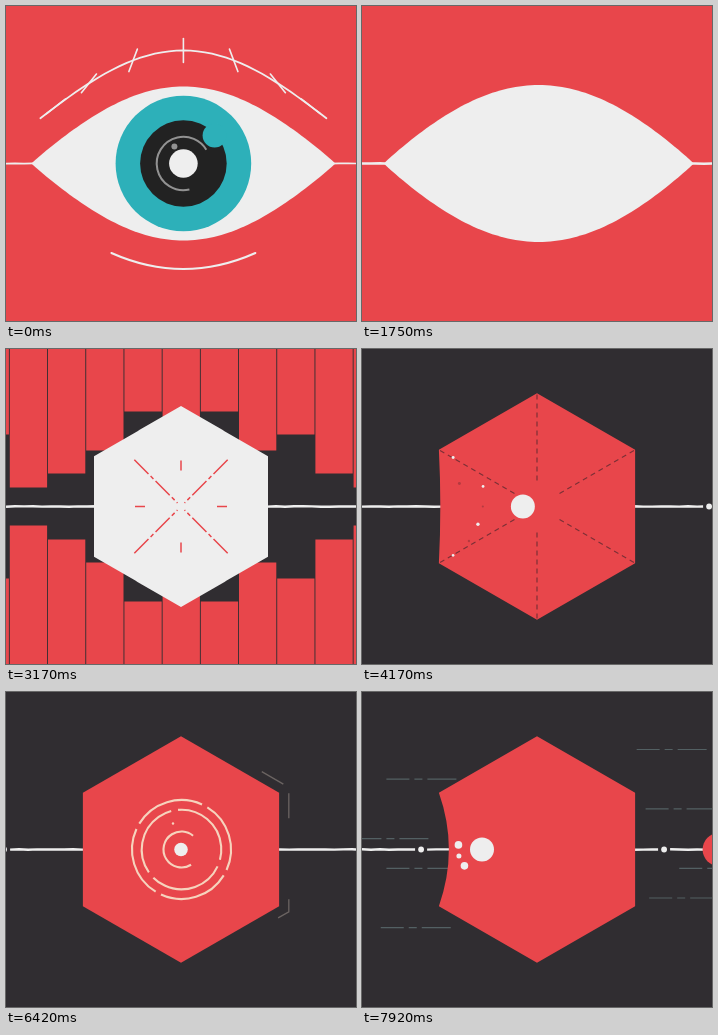
An HTML page with a canvas for the animation above (8 s loop, 350 by 315 pixels).

```html
<!DOCTYPE html>
<html lang="en">
<head>
<meta charset="utf-8">
<title>Eye to hexagon</title>
<style>
html, body { margin: 0; width: 100%; height: 100%; overflow: hidden; background: #e8464b; }
canvas { display: block; width: 100%; height: 100%; }
</style>
</head>
<body>
<canvas id="stage" width="350" height="315"></canvas>
<script>
const ctx = document.getElementById('stage').getContext('2d');
const W = 350, H = 315, MID = 157.5, CX = 175, EYE_X = 177.4;
const LOOP = 8000, STEP = 1000 / 12;
const RED = '#e8464b', WHITE = '#eeeeee', DARK = '#302d31', TEAL = '#2db0b9',
      INK = '#222222', GREY = '#929292', CREAM = '#f6d3bd', DUST = '#536063';
const RAD = Math.PI / 180;

const clamp = v => Math.max(0, Math.min(1, v));
const lerp = (a, b, k) => a + (b - a) * k;
const part = (t, a, b) => clamp((t - a) / (b - a));
const smooth = k => k * k * (3 - 2 * k);
const out = k => 1 - (1 - k) ** 3;
const ease = (t, a, b) => smooth(part(t, a, b));
const range = (n, fn) => Array.from({ length: n }, (_, i) => fn(i));
const rand = n => {
  const s = Math.sin(n * 127.1 + 11.7) * 43758.5453;
  return s - Math.floor(s);
};
const polar = (r, deg, cx = CX, cy = MID) =>
  [cx + r * Math.cos(deg * RAD), cy + r * Math.sin(deg * RAD)];
const hexagon = r => range(6, i => polar(r, i * 60 - 90));

function disc(x, y, r, color) {
  if (r <= 0) return;
  ctx.fillStyle = color;
  ctx.beginPath();
  ctx.arc(x, y, r, 0, 7);
  ctx.fill();
}

function arc(x, y, r, from, to, color, width) {
  ctx.strokeStyle = color;
  ctx.lineWidth = width;
  ctx.beginPath();
  ctx.arc(x, y, r, from * RAD, to * RAD);
  ctx.stroke();
}

function path(pts) {
  ctx.beginPath();
  pts.forEach(([x, y]) => ctx.lineTo(x, y));
}

function line(pts, color, width, dash = []) {
  ctx.strokeStyle = color;
  ctx.lineWidth = width;
  ctx.setLineDash(dash);
  path(pts);
  ctx.stroke();
  ctx.setLineDash([]);
}

// Draws the part of a polyline between two fractions of its length.
function trace(pts, from, to, color, width) {
  if (to <= from) return;
  let len = 0;
  for (let i = 1; i < pts.length; i++) {
    len += Math.hypot(pts[i][0] - pts[i - 1][0], pts[i][1] - pts[i - 1][1]);
  }
  line(pts, color, width, [0, len * from, len * (to - from), len * 2]);
}

function fillStage(color) {
  ctx.fillStyle = color;
  ctx.fillRect(0, 0, W, H);
}

// The horizontal line, with a slight wobble that changes every step.
function thread(x0, x1, n, width) {
  if (x1 <= x0) return;
  const pts = range(Math.ceil((x1 - x0) / 9), i =>
    [x0 + i * 9, MID + (rand(x0 + i * 9 + n * 3) - 0.5) * 0.6]);
  line([...pts, [x1, MID]], WHITE, width);
}

// Half heights across the shape, u from -1 to 1.
const eyeCurve = u => Math.max(0, Math.cos(u * Math.PI / 2)) ** 0.95;
const lensCurve = u => 1 - u * u;
const hexCurve = u => 1 - Math.abs(u) / 2;

// White shape that goes from eye to lens to hexagon.
function whitePath(t) {
  const a = ease(t, 1580, 2080), b = ease(t, 2520, 2950);
  const cx = lerp(EYE_X, CX, a);
  const half = lerp(lerp(152, 163, a), 87, b);
  const side = dir => range(81, i => {
    const u = (i / 40 - 1) * dir;
    const h = lerp(lerp(77 * eyeCurve(u), 82.5 * lensCurve(u), a), 100.5 * hexCurve(u), b);
    return [cx + u * half, MID - h * dir];
  });
  path([...side(1), ...side(-1)]);
  ctx.closePath();
}

const gaze = t => ease(t, 250, 750) * (1 - ease(t, 1200, 1450));

function brows(t) {
  const show = 1 - ease(t, 1420, 1750);
  if (show <= 0) return;
  const top = 44.5 - 20 * ease(t, 1300, 1600);
  const browY = x => top + 75 * (1 - Math.cos(x / 97));
  const half = (143 + 2 * gaze(t)) * show;
  ctx.lineCap = 'round';
  line(range(41, i => {
    const x = half * (i / 20 - 1);
    return [EYE_X + x, browY(x)];
  }), WHITE, 1.8);
  for (let i = -3; i <= 3; i++) {
    const x = 147 * Math.sin(i * 20 * RAD), tilt = x * 0.41 - 90;
    const end = r => polar(r * show, tilt * 1, EYE_X + x, browY(x));
    line([end(-12), end(12)].map(([px, py]) => [2 * (EYE_X + x) - px, py]), WHITE, 1.6);
  }
  const w = (72 + 2 * gaze(t)) * show;
  ctx.beginPath();
  ctx.lineWidth = 2;
  ctx.moveTo(EYE_X - w, 263 - 16 * show);
  ctx.quadraticCurveTo(EYE_X, 263 + 16 * show, EYE_X + w, 263 - 16 * show);
  ctx.stroke();
  ctx.lineCap = 'butt';
}

function iris(t) {
  const size = 1 - ease(t, 1450, 1750), look = gaze(t);
  if (size <= 0) return;
  ctx.save();
  ctx.translate(EYE_X - 23 * look, MID + 16 * look);
  ctx.scale(size, size);
  disc(0, 0, 67.8, TEAL);
  disc(0, 0, 43.3, INK);
  disc(...polar(42, lerp(-42, -70, look), 0, 0), 12, TEAL);
  arc(0, 0, 26.7, lerp(77, 85, look), lerp(329, 360, look), GREY, 2);
  disc(-9, -17, 3, GREY);
  disc(0, 0, 14.3, WHITE);
  ctx.restore();
}

// Isometric line drawing: nested chevrons, six spokes and two strays.
const chevron = w => [
  [CX + 0.32 * w, MID - 0.4 * w], [CX + w, MID],
  [CX, MID + 0.59 * w], [CX - 0.78 * w, MID + 0.12 * w]];
const FACETS = [
  ...[33, 56, 100].map(chevron),
  ...range(6, i => {
    const start = i % 3 === 1 ? 27 : 60;
    return [polar(start, 30 + i * 60), polar(start + 38, 30 + i * 60)];
  }),
  [[186, 94], [209, 81]],
  [[180, 195], [218, 217]]
];

function facets(t) {
  const from = ease(t, 2350, 2620), to = ease(t, 1850, 2220);
  FACETS.forEach(f => trace(f, from, to, RED, 1.4));
}

function sparks(t, color) {
  if (t <= 1760 || t > 2650) return;
  const fly = out(part(t, 1750, 2750)) / 0.875;
  const size = 1 - ease(t, 2330, 2650);
  for (let i = 0; i < 27; i++) {
    const far = i % 2, swing = rand(i + 40);
    const r = far ? 95 + 28 * swing : 45 + 85 * swing;
    const [x, y] = polar(r * fly, i * 137.5 + 20);
    disc(x, y, (far ? 2.5 + 2 * rand(i) : 1 + 1.2 * rand(i)) * size, color);
  }
}

// Half openings of the bars, left to right.
const GAPS = [72, 19, 33, 56, 95, 85, 95, 56, 72, 33, 19];

function bars(t) {
  fillStage(DARK);
  ctx.fillStyle = RED;
  const seam = part(t, 2500, 2800);
  GAPS.forEach((g, i) => {
    const gap = t < 3166 ? g * part(t, 2600, 3166) ** 2 : lerp(g, 162, ease(t, 3166, 3750));
    const x = 3.3 + (i - 1) * 38.2 + seam * 0.5, w = 38.3 - seam;
    ctx.fillRect(x, 0, w, Math.max(0, MID - gap));
    ctx.fillRect(x, MID + gap, w, H);
  });
}

function cross(t) {
  const k = ease(t, 2850, 3160) * (1 - ease(t, 3420, 3650));
  if (k <= 0) return;
  for (let a = 0; a < 360; a += 90) {
    trace([polar(46, a), polar(36, a)], 0, k, RED, 1.5);
    line([polar(66, a + 45), polar(66 - 61 * k, a + 45)], RED, 1.5, [20, 3, 4, 3]);
  }
}

function opening(t, n) {
  if (t < 2500) fillStage(RED);
  else bars(t);
  thread(0, W, n, t < 1600 ? 1.7 : 2.4);
  brows(t);
  sparks(t, WHITE);
  ctx.save();
  whitePath(t);
  ctx.fillStyle = WHITE;
  ctx.fill();
  ctx.clip();
  iris(t);
  facets(t);
  sparks(t, RED);
  ctx.restore();
  cross(t);
}

// Beads ride the line to the left, evenly spaced.
function beads(t, n) {
  if (t < 3900) return thread(0, W, n, 2.4);
  const gap = 243;
  const shift = t < 6417 ? lerp(347, -245, (t - 4167) / 2250)
                         : lerp(-2, -427, (t - 6417) / 1500);
  for (let x = (shift % gap + gap) % gap - gap; x < W + gap; x += gap) {
    thread(Math.max(0, x + 6), Math.min(W, x + gap - 6), n, 2.4);
    disc(x, MID, 2.9, WHITE);
  }
}

function streaks(t) {
  if (t < 7560) return;
  ctx.globalAlpha = part(t, 7500, 7750);
  for (let i = 0; i < 8; i++) {
    const y = 57.5 + 29.7 * (i > 4 ? i - 1 : i);
    const x = (i % 2 ? -30 : 270) + 55 * rand(i + 3) + (7917 - t) * 0.35;
    line([[x + 70, y], [x, y]], DUST, 1.2, [29, 5, 8, 5]);
  }
  ctx.globalAlpha = 1;
}

function redHex(r, bend) {
  const p = hexagon(r);
  path(p.slice(0, 5));
  ctx.quadraticCurveTo(p[4][0] + bend, MID, ...p[5]);
  ctx.closePath();
  ctx.fillStyle = RED;
  ctx.fill();
}

function creases(t) {
  const to = ease(t, 3800, 4080), from = ease(t, 4450, 4900);
  if (to <= from) return;
  for (let a = 30; a < 390; a += 60) {
    line([polar(lerp(112, 22, from), a), polar(lerp(112, 22, to), a)], '#7d3036', 1.2, [5, 4]);
  }
}

// A circle broken by evenly spaced gaps, angles in degrees.
function ring(r, count, gap, first, turn) {
  const span = 360 / count;
  for (let i = 0; i < count; i++) {
    const a = first + turn + i * span;
    arc(CX + 0.5, MID, r, a + gap / 2, a + span - gap / 2, CREAM, 2.1);
  }
}

function rings(t) {
  const grow = out(part(t, 5150, 5800)) * (1 - ease(t, 6750, 7200));
  if (grow <= 0.02) return;
  const turn = (t - 6417) * 0.06;
  ring(49.5 * grow, 4, 7, -62, turn);
  ring(39.8 * grow, 3, 10, -100, -turn);
  ring(18 * grow, 1, 108, 4, turn * 1.5);
  disc(CX - 8 * grow, MID - 26 * grow, 1.2, CREAM);
}

function outline(t) {
  if (t < 5950 || t > 7000) return;
  const p = hexagon(124.5), shift = (t - 6417) / 400;
  ctx.globalAlpha = ease(t, 5950, 6200) * (1 - ease(t, 6700, 7000));
  [0.75, 1.05, 1.9].forEach(side => {
    const a = side + shift;
    trace([...p, p[0]], clamp(a / 6), clamp((a + 0.2) / 6), '#6b6462', 1.3);
  });
  ctx.globalAlpha = 1;
}

function ball(t) {
  const enter = t < 4167 ? lerp(-20, 161, part(t, 3720, 4167))
                         : lerp(161, CX, out(part(t, 4167, 4420)));
  const x = enter - 55 * ease(t, 7350, 7917);
  const small = ease(t, 5000, 5500) * (1 - ease(t, 6850, 7250));
  disc(x, MID, lerp(12, 6.8, small), WHITE);
  const trail = ease(t, 7500, 7917);
  for (let i = 0; i < 3; i++) {
    disc(...polar(24 * trail, 137 + 27 * i, x), (i % 2 ? 2.5 : 3.8) * trail, WHITE);
  }
}

function splash(t) {
  if (t < 3950 || t > 4650) return;
  const k = out(part(t, 3950, 4300));
  const size = 1 - ease(t, 4250, 4650);
  for (let i = 0; i < 7; i++) {
    const [x, y] = polar((22 + 32 * rand(i + 8)) * k, i * 25 - 75, 78);
    disc(x, y, (1 + 0.7 * rand(i)) * size, i % 2 ? '#b43a40' : WHITE);
  }
}

function hexScene(t, n) {
  bars(t);
  streaks(t);
  beads(t, n);
  const fill = out(part(t, 3420, 3760));
  if (fill < 1) {
    path(hexagon(lerp(100.5, 113.3, fill)));
    ctx.fillStyle = WHITE;
    ctx.fill();
  }
  const hit = part(t, 3900, 4500);
  redHex(113.3 * fill, 20 * ease(t, 7380, 7900) - 6 * Math.sin(hit * Math.PI * 3) * (1 - hit));
  cross(t);
  creases(t);
  outline(t);
  rings(t);
  splash(t);
  ball(t);
  if (t > 7600) disc(357 + (7917 - t) * 0.3, MID, 16.5, RED);
}

function draw(now) {
  const n = Math.floor((now % LOOP) / STEP + 0.1) % 96;
  const t = n * STEP;
  if (t < 3400) opening(t, n);
  else hexScene(t, n);
  requestAnimationFrame(draw);
}

draw(0);
</script>
</body>
</html>
```
